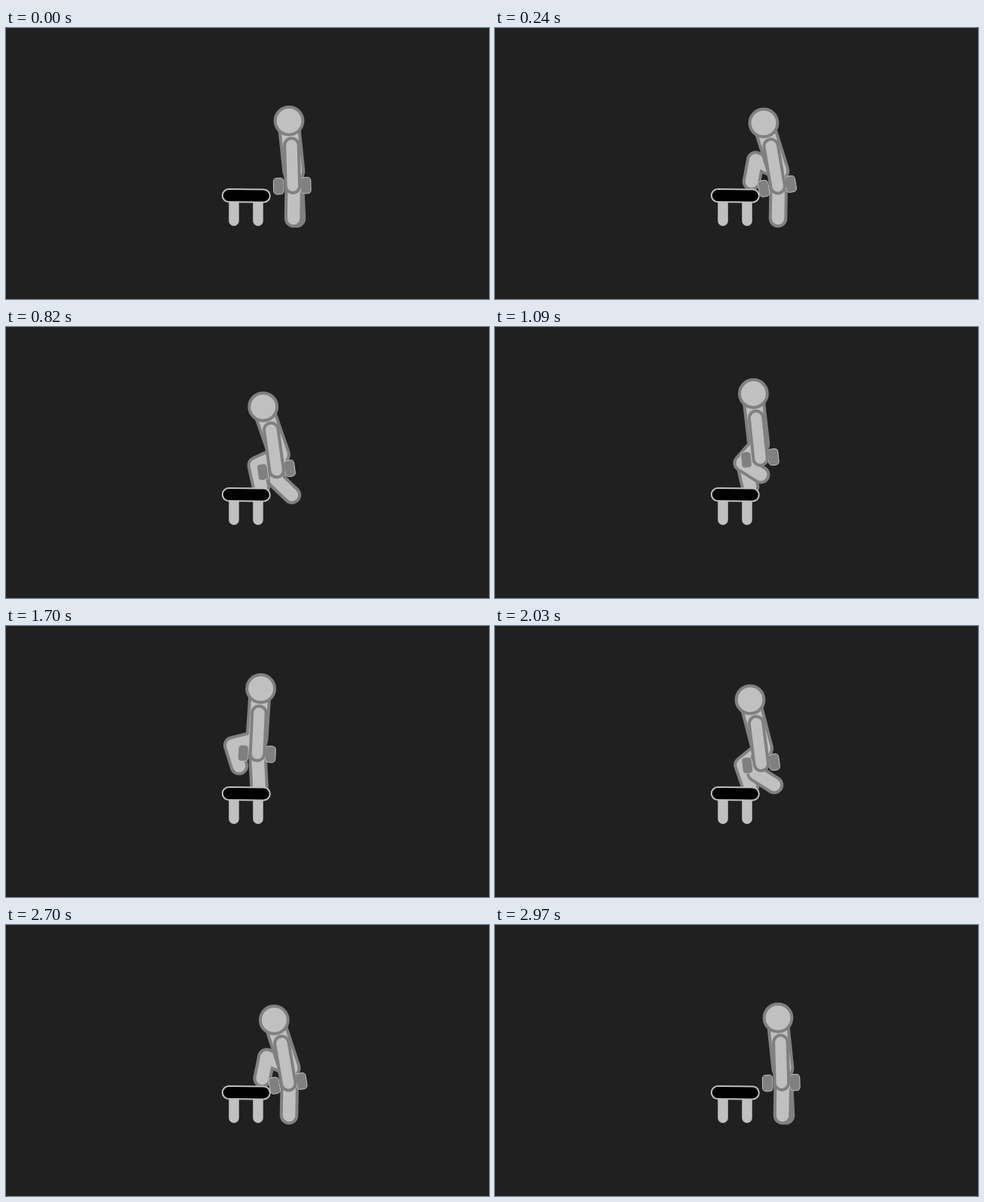
Recreate the animation shown at these times as an HTML page with a canvas. Size 640 px wide and 360 px high, loop 3.18 s.

```html
<!DOCTYPE html>
<html lang="en">
<head>
<meta charset="utf-8">
<title>Step-up with dumbbells</title>
<style>
html, body { margin: 0; width: 100%; height: 100%; overflow: hidden; background: #202020; }
canvas { display: block; width: 640px; height: 360px; }
</style>
</head>
<body>
<canvas id="stage" width="640" height="360"></canvas>
<script>
const ctx = document.getElementById('stage').getContext('2d');
const BACK = '#202020', LIGHT = '#c0c0c0', GRAY = '#808080';
const LOOP = 3180, MOVE = 1300, DOWN = 1670, STEP = MOVE / 43;
const TORSO = 67, SHOULDER = 34.5, ARM = 54, THIGH = 34, SHIN = 29;

const phase = (u, from, to) => Math.min(1, Math.max(0, (u - from) / (to - from)));
const smooth = p => p * p * (3 - 2 * p);
const arc = p => Math.sin(Math.PI * p);

// foot onto the bench, lean over it, climb, then lift the trailing knee
function poseAt(u) {
  const step = phase(u, 0, 240), reach = smooth(step);
  const bend = phase(u, 240, 520);
  const climb = phase(u, 515, 1090);
  const plant = smooth(phase(u, 515, 690));
  const lift = smooth(phase(u, 1090, 1280));
  return {
    hip: [
      382 - 6 * reach + bend - 27 * smooth(climb) - 17 * lift,
      190 - bend - 34 * climb ** 0.85 - 5 * lift
    ],
    lean: -0.105 - 0.198 * reach - 0.112 * bend + 0.303 * climb ** 2 + 0.18 * lift,
    swing: 0.028 + 0.139 * reach - 0.018 * bend - 0.047 * climb ** 2 - 0.148 * lift,
    farFoot: [
      385 - 45 * reach - 3 * bend + plant - 2.5 * lift,
      253 - 49 * reach - 8 * arc(step) - bend + 9 * plant + lift
    ],
    nearFoot: [
      381 - 6 * reach - 23 * climb + 16 * arc(climb) - 43.5 * lift,
      253 - 57 * climb - 10 * lift
    ]
  };
}

function trace(pts, width, color) {
  ctx.beginPath();
  pts.forEach(([x, y]) => ctx.lineTo(x, y));
  ctx.lineWidth = width;
  ctx.strokeStyle = color;
  ctx.stroke();
}

// parts of one group share a single outline
function limbs(parts, rim = 8, edge = GRAY, fill = LIGHT) {
  for (const [pts, width] of parts) trace(pts, width, edge);
  for (const [pts, width] of parts) trace(pts, width - rim, fill);
}

function leg(hip, foot) {
  const dx = foot[0] - hip[0], dy = foot[1] - hip[1], d = Math.hypot(dx, dy);
  let a = d * THIGH / (THIGH + SHIN), h = 0;
  if (d < THIGH + SHIN) {
    a = (THIGH * THIGH - SHIN * SHIN + d * d) / (2 * d);
    h = Math.sqrt(Math.max(0, THIGH * THIGH - a * a));
  }
  const knee = [hip[0] + (dx * a - dy * h) / d, hip[1] + (dy * a + dx * h) / d];
  return [[hip, knee, foot], 24.5];
}

function bench() {
  for (const x of [302, 334]) trace([[x, 228], [x, 256.3]], 13.5, LIGHT);
  limbs([[[[295.3, 222.6], [341.3, 223]], 19]], 4, LIGHT, '#000');
}

function dumbbell([x, y], angle) {
  ctx.save();
  ctx.translate(x - 0.7, y);
  ctx.rotate(-angle);
  ctx.fillStyle = GRAY;
  ctx.strokeStyle = LIGHT;
  ctx.lineWidth = 1;
  for (const side of [-18, 18]) {
    ctx.beginPath();
    ctx.roundRect(side - 6.75, -10.75, 13.5, 21.5, 4.5);
    ctx.fill();
    ctx.stroke();
  }
  ctx.restore();
}

function draw(u) {
  const { hip, lean, swing, farFoot, nearFoot } = poseAt(u);
  const spine = r => [hip[0] + r * Math.sin(lean), hip[1] - r * Math.cos(lean)];
  const head = spine(TORSO), shoulder = spine(SHOULDER);
  const hand = [shoulder[0] + ARM * Math.sin(swing), shoulder[1] + ARM * Math.cos(swing)];
  const back = [head, hip].map(([x, y]) => [x - 0.7, y]);

  ctx.fillStyle = BACK;
  ctx.fillRect(0, 0, 640, 360);
  ctx.lineCap = ctx.lineJoin = 'round';

  limbs([leg(hip, farFoot)]);
  bench();
  limbs([[back, 30], leg(hip, nearFoot)]);

  ctx.beginPath();
  ctx.arc(...head, 18.4, 0, Math.PI * 2);
  ctx.fillStyle = LIGHT;
  ctx.fill();
  ctx.lineWidth = 4;
  ctx.strokeStyle = GRAY;
  ctx.stroke();

  dumbbell(hand, swing);
  limbs([[[shoulder, hand], 22.5]]);
}

// up, hold, same way down, hold
function progress(t) {
  const held = s => Math.min(MOVE, Math.floor((s + 5) / STEP) * STEP);
  return t < DOWN ? held(t) : MOVE - held(t - DOWN);
}

const start = performance.now();
function frame(now) {
  draw(progress(Math.max(0, now - start) % LOOP));
  requestAnimationFrame(frame);
}
draw(0);
requestAnimationFrame(frame);
</script>
</body>
</html>
```
